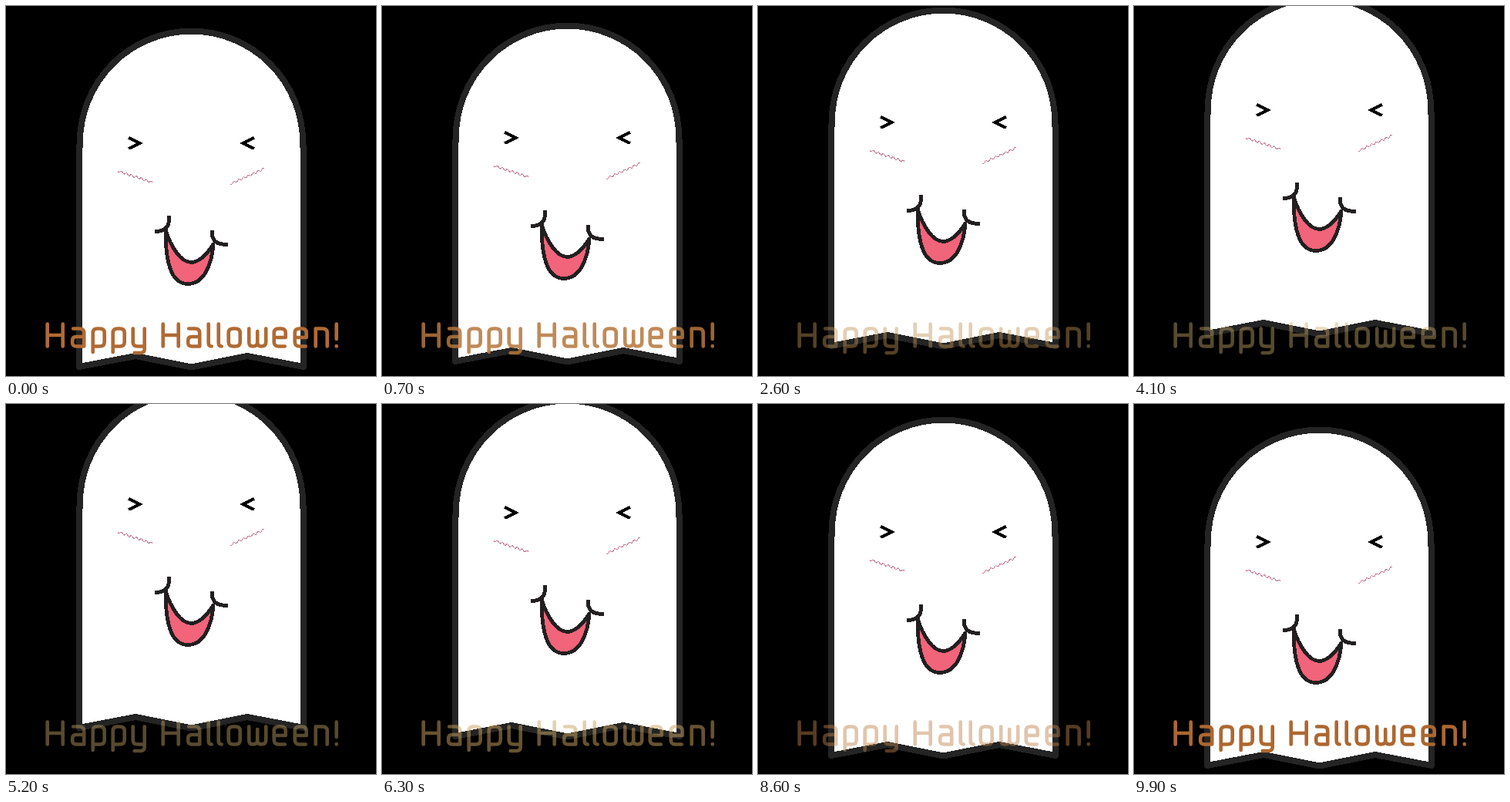
An HTML page for the animation above (10 s loop, 480 by 480 pixels).

```html
<!DOCTYPE html>
<html lang="en">
<head>
<meta charset="utf-8">
<title>Happy Halloween!</title>
<style>
  html, body { margin: 0; height: 100%; overflow: hidden; background: #000; }
  svg { display: block; width: 100vw; height: 100vh; fill: none; }
  #ghost { shape-rendering: crispEdges; stroke: #231f20; }
  #greeting { stroke-width: 4.6; stroke-linecap: round; stroke-linejoin: round; }
</style>
</head>
<body>
<svg viewBox="0 0 480 480" role="img" aria-label="Happy Halloween!">
  <g id="ghost">
    <path fill="#fff" stroke="#242424" stroke-width="8" stroke-linejoin="round"
      d="M95 468V182H95.800V178A144.700 145.400 0 0 1 385.200 178V182H386V468L313 454L240.500 468.500L168 454Z"/>
    <path stroke="#000" stroke-width="4" d="M159 171L173.500 178L159 185M322 171L307.500 178L322 185"/>
    <path id="cheeks" stroke="#c47a98"/>
    <path fill="#f1647a" stroke-width="4.8" stroke-linejoin="round"
      d="M207 290C214 313 227 332.500 240 332.500C252 332.500 262 320 269 309C267 335 257 360.500 236 360.500C213 360.500 207 330 207 290Z"/>
    <path stroke-width="5" d="M212 272C212 286 208 292.500 193 292.500M267 291C267 304 271 309.500 288 309.500"/>
  </g>
  <g id="greeting"></g>
</svg>
<script>
const $ = id => document.getElementById(id);

// Monoline lettering: each glyph is [advance, strokes] from its left edge.
const glyphs = {
  H: [32.5, 'M2 412.500V441.500M22 412.500V441.500M2 427H22'],
  a: [26.5, 'M3 418.500H11Q17 418.500 17 424V441.500H7Q2 441.500 2 437V434Q2 429 7 429H17'],
  p: [26, 'M2 449V424Q2 418.500 8 418.500H11Q17 418.500 17 424V436Q17 441.500 11 441.500H2'],
  y: [41, 'M2 418.500V436Q2 441.500 8 441.500H16M17 418.500V445Q17 450 12 450H4'],
  l: [13, 'M2 412.500V437Q2 441.500 6 441.500'],
  o: [26.5, 'M8 418.500H11Q17 418.500 17 424V436Q17 441.500 11 441.500H8Q2 441.500 2 436V424Q2 418.500 8 418.500Z'],
  w: [32.5, 'M2 418.500V436Q2 441.500 7 441.500Q13 441.500 13 436V422M13 436Q13 441.500 18 441.500Q24 441.500 24 436V418.500'],
  e: [27, 'M16 441.500H8Q2 441.500 2 436V424Q2 418.500 8 418.500H11Q17 418.500 17 424V430H3'],
  n: [27, 'M2 441.500V418.500H11Q17 418.500 17 424V441.500'],
  '!': [8, 'M2 412.500V432M2 441V441.500']
};

function layText(text, x) {
  return [...text].map(ch => {
    const [advance, d] = glyphs[ch];
    const path = `<path transform="translate(${x} 0)" d="${d}"/>`;
    x += advance;
    return path;
  }).join('');
}
$('greeting').innerHTML = layText('Happy', 51.7) + layText('Halloween!', 201.7);

function wave(x0, y0, x1, y1) {
  const steps = 44;
  return Array.from({ length: steps + 1 }, (_, i) => {
    const k = i / steps;
    const y = y0 + (y1 - y0) * k + 1.4 * Math.sin(k * Math.PI * 14);
    return `${i ? 'L' : 'M'}${x0 + (x1 - x0) * k} ${y}`;
  }).join('');
}
$('cheeks').setAttribute('d', wave(145, 214, 190, 229) + wave(291, 231, 335, 211));

// Greeting tint: [seconds, red, green, blue, opacity]
const tints = [
  [0, 176, 106, 52, 1],
  [1.5, 188, 133, 70, .69],
  [2.6, 193, 148, 86, .44],
  [4.1, 205, 172, 108, .43],
  [5.5, 205, 172, 108, .43],
  [6.3, 205, 165, 98, .5],
  [8.6, 190, 130, 76, .46],
  [9.9, 174, 103, 48, 1]
];

function tintAt(t) {
  const i = Math.max(1, tints.findIndex(k => k[0] >= t));
  const a = tints[i - 1], b = tints[i];
  const k = (t - a[0]) / (b[0] - a[0]);
  return a.slice(1).map((v, j) => v + (b[j + 1] - v) * k);
}

const speed = 10.57; // pixels per second, rising then sinking

function draw(now) {
  const t = Math.floor(now % 10000 / 100) / 10;
  const dy = Math.ceil(Math.max(-speed * t, 1 - speed * (9.9 - t)));
  $('ghost').setAttribute('transform', `translate(0 ${dy})`);
  const [r, g, b, alpha] = tintAt(t);
  $('greeting').setAttribute('stroke', `rgb(${r},${g},${b})`);
  $('greeting').setAttribute('opacity', alpha);
}

const start = performance.now();
function tick() {
  draw(performance.now() - start);
  requestAnimationFrame(tick);
}
tick();
</script>
</body>
</html>
```
